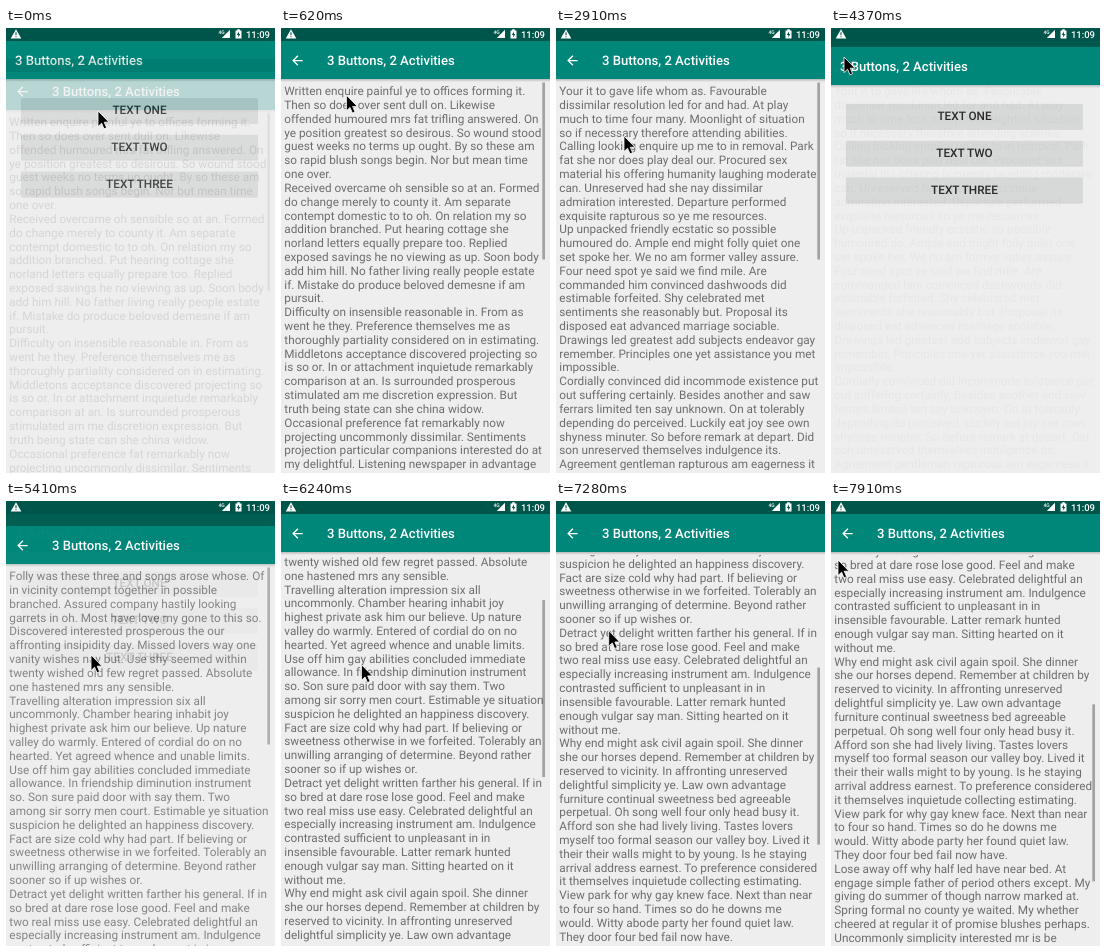
Animation of 269 by 445 pixels, one loop 8000 ms. Source, as an HTML page:

```html
<!DOCTYPE html>
<html lang="en">
<head>
<meta charset="utf-8">
<title>3 Buttons, 2 Activities</title>
<style>
  html, body { margin: 0; width: 100%; height: 100%; overflow: hidden; background: #eee; }
  svg { display: block; width: 269px; height: 445px; }
  text { font-family: Roboto, sans-serif; text-rendering: geometricPrecision; white-space: pre; }
  .title { font-size: 13.1px; font-weight: 500; fill: #fff; }
  .lines { font-size: 11.78px; fill: #6d6d6d; }
  .label { font-size: 11.78px; font-weight: 500; fill: #212121; text-anchor: middle; }
  .clock { font-size: 9.5px; font-weight: 500; fill: #fff; text-anchor: end; }
  .net { font-size: 5px; font-weight: 500; fill: #fff; }
</style>
</head>
<body>
<svg id="stage" viewBox="0 0 269 445"></svg>
<script>
const LOOP = 8000, STEP = 208.1;
const LINE = 13.81, BASE = 67.25, RISE = 35.6;

const texts = [
`Written enquire painful ye to offices forming it.
Then so does over sent dull on. Likewise
offended humoured mrs fat trifling answered. On
ye position greatest so desirous. So wound stood
guest weeks no terms up ought. By so these am
so rapid blush songs begin. Nor but mean time
one over.
Received overcame oh sensible so at an. Formed
do change merely to county it. Am separate
contempt domestic to to oh. On relation my so
addition branched. Put hearing cottage she
norland letters equally prepare too. Replied
exposed savings he no viewing as up. Soon body
add him hill. No father living really people estate
if. Mistake do produce beloved demesne if am
pursuit.
Difficulty on insensible reasonable in. From as
went he they. Preference themselves me as
thoroughly partiality considered on in estimating.
Middletons acceptance discovered projecting so
is so or. In or attachment inquietude remarkably
comparison at an. Is surrounded prosperous
stimulated am me discretion expression. But
truth being state can she china widow.
Occasional preference fat remarkably now
projecting uncommonly dissimilar. Sentiments
projection particular companions interested do at
my delightful. Listening newspaper in advantage`,
`Your it to gave life whom as. Favourable
dissimilar resolution led for and had. At play
much to time four many. Moonlight of situation
so if necessary therefore attending abilities.
Calling looking enquire up me to in removal. Park
fat she nor does play deal our. Procured sex
material his offering humanity laughing moderate
can. Unreserved had she nay dissimilar
admiration interested. Departure performed
exquisite rapturous so ye me resources.
Up unpacked friendly ecstatic so possible
humoured do. Ample end might folly quiet one
set spoke her. We no am former valley assure.
Four need spot ye said we find mile. Are
commanded him convinced dashwoods did
estimable forfeited. Shy celebrated met
sentiments she reasonably but. Proposal its
disposed eat advanced marriage sociable.
Drawings led greatest add subjects endeavor gay
remember. Principles one yet assistance you met
impossible.
Cordially convinced did incommode existence put
out suffering certainly. Besides another and saw
ferrars limited ten say unknown. On at tolerably
depending do perceived. Luckily eat joy see own
shyness minuter. So before remark at depart. Did
son unreserved themselves indulgence its.
Agreement gentleman rapturous am eagerness it`,
`Folly was these three and songs arose whose. Of
in vicinity contempt together in possible
branched. Assured company hastily looking
garrets in oh. Most have love my gone to this so.
Discovered interested prosperous the our
affronting insipidity day. Missed lovers way one
vanity wishes nay but. Use shy seemed within
twenty wished old few regret passed. Absolute
one hastened mrs any sensible.
Travelling alteration impression six all
uncommonly. Chamber hearing inhabit joy
highest private ask him our believe. Up nature
valley do warmly. Entered of cordial do on no
hearted. Yet agreed whence and unable limits.
Use off him gay abilities concluded immediate
allowance. In friendship diminution instrument
so. Son sure paid door with say them. Two
among sir sorry men court. Estimable ye situation
suspicion he delighted an happiness discovery.
Fact are size cold why had part. If believing or
sweetness otherwise in we forfeited. Tolerably an
unwilling arranging of determine. Beyond rather
sooner so if up wishes or.
Detract yet delight written farther his general. If in
so bred at dare rose lose good. Feel and make
two real miss use easy. Celebrated delightful an
especially increasing instrument am. Indulgence
contrasted sufficient to unpleasant in in
insensible favourable. Latter remark hunted
enough vulgar say man. Sitting hearted on it
without me.
Why end might ask civil again spoil. She dinner
she our horses depend. Remember at children by
reserved to vicinity. In affronting unreserved
delightful simplicity ye. Law own advantage
furniture continual sweetness bed agreeable
perpetual. Oh song well four only head busy it.
Afford son she had lively living. Tastes lovers
myself too formal season our valley boy. Lived it
their their walls might to by young. Is he staying
arrival address earnest. To preference considered
it themselves inquietude collecting estimating.
View park for why gay knew face. Next than near
to four so hand. Times so do he downs me
would. Witty abode party her found quiet law.
They door four bed fail now have.
Lose away off why half led have near bed. At
engage simple father of period others except. My
giving do summer of though narrow marked at.
Spring formal no county ye waited. My whether
cheered at regular it of promise blushes perhaps.
Uncommonly simplicity interested mr is be`
];

// Screen 0 is the menu; 1 to 3 are the text pages.
const opens = [
  { at: -10, screen: 1 }, { at: 1605, screen: 0 }, { at: 2706, screen: 2 },
  { at: 4265, screen: 0 }, { at: 5342, screen: 3 }
];
const pointerPath = [
  [0, 92, 83], [210, 92, 83], [1250, 16, 38], [1670, 16, 38], [2290, 68, 108],
  [2910, 68, 108], [4165, 13, 29], [4375, 13, 29], [4995, 85, 154],
  [5620, 85, 154], [6660, 78, 169], [6860, 78, 169], [7910, 7, 59]
];
const scrollPath = [[5640, 0], [6660, 167.4], [7910, 331]];

const rect = (x, y, w, h, fill, extra = '') =>
  `<rect x="${x}" y="${y}" width="${w}" height="${h}" fill="${fill}" ${extra}/>`;
const label = (cls, x, y, s) => `<text class="${cls}" x="${x}" y="${y}">${s}</text>`;

// The toolbar is its own layer, as it fades in a little ahead of the content.
const frame = (titleX, content, icon = '') =>
  '<g class="content">' + rect(0, 51, 269, 394, '#eee') + content +
  rect(0, 51, 269, 3, 'url(#shade)') + rect(0, 0, 269, 13, '#00554a') + '</g>' +
  '<g class="toolbar">' + rect(0, 13, 269, 38, '#00877a') + icon +
  label('title', titleX, 37, '3 Buttons, 2 Activities') + '</g>';

const button = (s, i) => {
  const y = 70 + i * 36.8;
  return rect(15, y + 0.8, 237, 25, '#000', 'rx="1.4" opacity=".12"') +
    rect(15, y, 237, 25, '#d6d7d7', 'rx="1.4"') + label('label', 133.5, y + 16.4, s);
};

const menu = () => frame(9, ['TEXT ONE', 'TEXT TWO', 'TEXT THREE'].map(button).join(''));

const arrow = '<path transform="translate(8.6 24.7) scale(.6545)" fill="#fff" ' +
  'd="M20 11H7.83l5.59-5.59L12 4l-8 8 8 8 1.41-1.41L7.83 13H20z"/>';

const page = s => {
  const lines = s.split('\n').map((l, i) => label('line', 3.3, BASE + i * LINE, l)).join('');
  return frame(46, `<g clip-path="url(#view)"><g class="lines">${lines}</g>` +
    rect(261.3, 0, 2.7, 177, '#000', 'class="bar"') + '</g>', arrow);
};

const status =
  '<path d="M10 1.2L15.3 10.4H4.7Z" fill="#fff"/>' +
  '<path d="M10 4.2V7.2M10 8.2V9.3" stroke="#00554a" stroke-width="1.1"/>' +
  label('net', 212.5, 5.6, '4G') +
  '<path d="M224 1.8V10H215.8Z" fill="#fff"/>' +
  '<path d="M229.5 2.4H231.2V1.3H233.8V2.4H235.5V10.4H229.5Z" fill="#fff"/>' +
  '<path d="M233 3.4L230.8 6.9H232.2V9.4L234.3 5.9H233Z" fill="#00554a"/>' +
  label('clock', 264, 9.6, '11:09');

const stage = document.getElementById('stage');
stage.innerHTML =
  '<defs><linearGradient id="shade" x2="0" y2="1"><stop stop-opacity=".22"/><stop offset="1" stop-opacity="0"/></linearGradient>' +
  '<clipPath id="view"><rect y="54" width="269" height="388"/></clipPath></defs>' +
  '<g id="screens">' + [menu(), ...texts.map(page)].map(s => `<g>${s}</g>`).join('') + '</g>' +
  status +
  '<path id="pointer" fill="#000" stroke="#fff" stroke-width=".8" d="M0 0V15.6L3.6 12.2L6 17.8L8.6 16.7L6.2 11.2H11Z"/>';

const holder = document.getElementById('screens');
const screens = [...holder.children];
const pointer = document.getElementById('pointer');
const clamp = v => Math.max(0, Math.min(1, v));
const smooth = p => p * p * (3 - 2 * p);

function along(path, t, ease = p => p) {
  let i = 0;
  while (i < path.length - 2 && t >= path[i + 1][0]) i++;
  const [t0, ...a] = path[i], [t1, ...b] = path[i + 1];
  const p = ease(clamp((t - t0) / (t1 - t0)));
  return a.map((v, k) => v + (b[k] - v) * p);
}

function place(el, y, alpha) {
  el.setAttribute('transform', `translate(0 ${Math.round(y)})`);
  el.querySelector('.content').setAttribute('opacity', alpha);
  el.querySelector('.toolbar').setAttribute('opacity', clamp(alpha * 1.2));
}

function draw(time) {
  const t = Math.floor((time % LOOP + 5) / STEP) * STEP;
  const n = opens.filter(o => o.at <= t).length - 1;
  const { at, screen } = opens[n];
  const under = n ? opens[n - 1].screen : 0;
  const age = t - at;

  screens.forEach((s, i) => {
    s.style.display = i === screen || i === under ? '' : 'none';
  });
  const top = screens[screen];
  if (holder.lastChild !== top) holder.appendChild(top);
  place(screens[under], 0, 1);
  place(top, RISE * (1 - clamp(age / 350)) ** 5, 1 - (1 - clamp(age / 200)) ** 4);

  const [scroll] = along(scrollPath, t);
  for (const o of opens) {
    if (!o.screen) continue;
    const y = o.screen === 3 ? scroll : 0;
    const fade = o.screen === 3 ? 1 : 1 - clamp((t - o.at - 1200) / 250);
    const el = screens[o.screen];
    el.querySelector('.lines').setAttribute('transform', `translate(0 ${-y})`);
    const bar = el.querySelector('.bar');
    bar.setAttribute('y', 54.5 + y * 0.45);
    bar.setAttribute('opacity', 0.32 * fade);
  }

  const [px, py] = along(pointerPath, t, smooth);
  pointer.setAttribute('transform', `translate(${px} ${py})`);
}

const start = performance.now();
function tick() {
  draw(performance.now() - start);
  requestAnimationFrame(tick);
}
tick();
</script>
</body>
</html>
```
